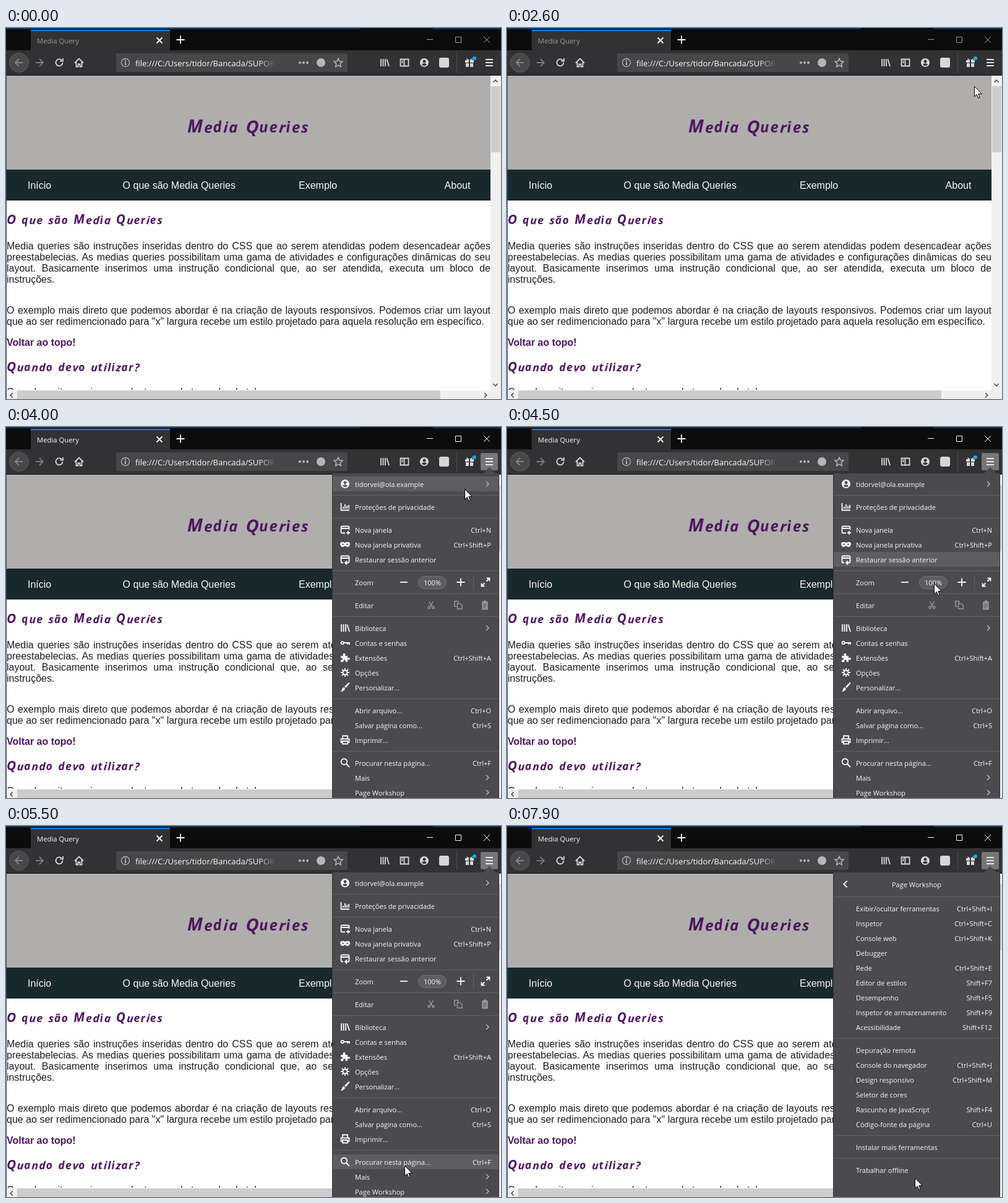
Animation of 800x600 px, one loop 8 s. Source, as an HTML page:

```html
<!DOCTYPE html>
<html lang="pt-BR">
<head>
<meta charset="utf-8">
<title>Media Query</title>
<style>
  html, body { margin: 0; width: 100%; height: 100%; overflow: hidden; background: #fff; }
  svg { display: block; width: 800px; height: 600px; }
  .ui { font: 500 11px "Open Sans", "Noto Sans", sans-serif; }
  .page { font: 16px/18px "Liberation Sans", Arial, sans-serif; }
  .hand { font-family: "Open Sans", "Noto Sans", sans-serif; font-weight: 700; font-style: italic;
    letter-spacing: 0.075em; word-spacing: 0.12em; }
  .hand tspan { font-size: 1.18em; }
  p { margin: 0 0 32px; text-align: justify; color: #1c1c1c; }
</style>
</head>
<body>
<svg viewBox="0 0 800 600">
  <defs>
    <linearGradient id="fade" gradientUnits="userSpaceOnUse" x1="408" x2="436">
      <stop stop-color="#f9f9fa"/><stop offset="1" stop-color="#f9f9fa" stop-opacity="0"/>
    </linearGradient>
    <clipPath id="panel"><rect x="528" y="75" width="268" height="525"/></clipPath>
    <clipPath id="view"><rect y="77" width="783" height="508"/></clipPath>
  </defs>
  <g id="page" class="page" clip-path="url(#view)"></g>
  <foreignObject class="page" x="1" y="344" width="782" height="150">
    <p>Media queries são instruções inseridas dentro do CSS que ao serem atendidas podem desencadear ações preestabelecias. As medias queries possibilitam uma gama de atividades e configurações dinâmicas do seu layout. Basicamente inserimos uma instrução condicional que, ao ser atendida, executa um bloco de instruções.</p>
    <p>O exemplo mais direto que podemos abordar é na criação de layouts responsivos. Podemos criar um layout que ao ser redimencionado para "x" largura recebe um estilo projetado para aquela resolução em específico.</p>
  </foreignObject>
  <g id="browser" class="ui"></g>
  <g id="menu" class="ui"></g>
  <path id="cursor" d="M0 0v16.5l3.8-3.6 2.6 6 2.4-1-2.6-5.8h5.4z" fill="#fff" stroke="#000"/>
</svg>
<script>
const $ = id => document.getElementById(id);
const WHITE = '#f9f9fa', GREY = '#b6b6b8', LINE = '#626266', PURPLE = '#4f165f';

const rect = (x, y, w, h, fill, more = '') =>
  `<rect x="${x}" y="${y}" width="${w}" height="${h}" fill="${fill}" ${more}/>`;
const text = (x, y, s, fill = WHITE, more = '') =>
  `<text x="${x}" y="${y}" fill="${fill}" ${more}>${s}</text>`;
const dot = (x, y, r, fill, more = '') =>
  `<circle cx="${x}" cy="${y}" r="${r}" fill="${fill}" ${more}/>`;

// Icons live in a 16 x 16 box
const strokes = {
  back: 'M14 8H2M8 2L2 8l6 6',
  reload: 'M13.5 8a5.5 5.5 0 1 1-1.6-4M14 1v4.5H9.5',
  home: 'M1 8.5l7-7 7 7M3.5 7v7.5h3v-4h3v4h3V7',
  star: 'M8 1.2l2 4.6 5 .5-3.8 3.4 1.1 5L8 12.1l-4.3 2.6 1.1-5L1 6.3l5-.5z',
  sidebar: 'M1.5 2.5h13v11h-13zM7.5 2.5v11M3.5 5.5h2M3.5 8h2',
  bars: 'M2 3h12M2 8h12M2 13h12',
  plus: 'M8 1.5v13M1.5 8h13',
  minus: 'M2 8h12',
  cross: 'M3.5 3.5l9 9M12.5 3.5l-9 9',
  chevron: 'M6 4l4 4-4 4',
  chart: 'M1.5 2v11.5H15M5 11V8M8 11V4M11 11V6.5M14 11V5',
  window: 'M14.5 8V4.5q0-2-2-2h-9q-2 0-2 2v7q0 2 2 2H8M1.5 6h13M13 10v6M10 13h6',
  restore: 'M5 13.5H3.5q-2 0-2-2v-7q0-2 2-2h9q2 0 2 2v7q0 2-2 2H8M1.5 6h13M11 10.5l-3 3 3 3',
  books: 'M2 2v12M5.5 2v12M9 2v12M11.5 2.5L15 14',
  key: 'M1.5 8a2.2 2.2 0 1 0 4.4 0a2.2 2.2 0 1 0-4.4 0M6 8h9v3M12 8v3',
  gear: 'M8 4.5a3.5 3.5 0 1 1-.1 0M8 1v3M8 12v3M1 8h3M12 8h3M3 3l2 2M11 11l2 2M13 3l-2 2M5 11l-2 2',
  printer: 'M4 6V1.5h8V6M4 12H1.5V6.5h13V12H12M4 10h8v4.5H4z',
  search: 'M6.5 1.5a4.8 4.8 0 1 1-.1 0M10 10l5 5',
  expand: 'M9.5 6.5L14 2M9.5 1.5h5v5M6.5 9.5L2 14M1.5 9.5v5h5',
  scissors: 'M4 1l6 10M12 1L6 11M4 10.5a2 2 0 1 1-.1 0M12 10.5a2 2 0 1 1-.1 0',
  copy: 'M5 10.5H1.5v-9h6V5M6.5 5.5h5l3 3v6h-8z'
};
const solids = {
  user: 'M8 1a7 7 0 1 1-.1 0zM8 3.5a2.5 2.5 0 1 0 .1 0zM3.8 11q4.2 4.5 8.4 0-1.5-1.7-4.2-1.7t-4.2 1.7z',
  mask: 'M0 7q0-3 3.5-3 2.5 0 4.5 1 2-1 4.5-1Q16 4 16 7q-.5 5-4 5-2 0-4-2-2 2-4 2-3.5 0-4-5zM2.5 7.5q2-1.5 4 .5-2 1.5-4-.5zM13.5 7.5q-2-1.5-4 .5 2 1.5 4-.5z',
  puzzle: 'M1 5h4Q3.5 1 6.5 1T8 5h4v3.5q4-1.5 4 1.3t-4 1.2v4H8.5q1-3.5-1.5-3.5T5.5 15H1v-3.5q3 1 3-1.5T1 8.5z',
  brush: 'M15 0q2 1-6 9L7 7q7-8 8-7zM6 8l2 2q-1 5-8 5 3-1 3-4 1-3 3-3z',
  gift: 'M1 4h6v4H1zM9 4h6v4H9zM2 9h5v6H2zM9 9h5v6H9zM3 1l5 3 5-3-1 3H4z',
  paste: 'M3 2h3V0h4v2h3v14H3zM5 6h6v1H5zM5 9h6v1H5zM5 12h4v1H5z'
};
function icon(name, x, y, color = WHITE, scale = 1, turn = 0, width = 1.8) {
  const paint = solids[name]
    ? `fill="${color}" fill-rule="evenodd"`
    : `fill="none" stroke="${color}" stroke-width="${width}"`;
  return `<path d="${solids[name] || strokes[name]}" ${paint}
    transform="translate(${x} ${y}) rotate(${turn}) scale(${scale}) translate(-8 -8)"/>`;
}

// Headings: slightly tilted letters with large capitals
const heading = (x, y, size, s) => text(x, y, s.replace(/[A-Z]/g, '<tspan>$&</tspan>'), PURPLE,
  `class="hand" font-size="${size}"
   rotate="${[...s].map((_, i) => (5 * Math.sin(i * 2.3)).toFixed(1)).join(' ')}"`);

$('page').innerHTML =
  rect(0, 77, 783, 508, '#fefefe') +
  rect(1, 77, 782, 152, '#afaeac') +
  rect(1, 229, 782, 50, '#19282c') +
  text(35, 260, 'Início') + text(188.6, 260, 'O que são Media Queries') +
  text(473, 260, 'Exemplo') + text(708.6, 260, 'About') +
  heading(293, 169, 24, 'Media Queries') +
  heading(1, 317, 17.6, 'O que são Media Queries') +
  text(1, 514, 'Voltar ao topo!', PURPLE, 'font-weight="bold"') +
  heading(1, 555, 17.6, 'Quando devo utilizar?') +
  text(1, 594, 'Quando o site precisar se adaptar a cada tamanho de tela.', '#1c1c1c');

$('browser').innerHTML =
  // scrollbars
  rect(783, 77, 17, 523, '#f0f0f0') + rect(0, 586, 800, 14, '#f0f0f0') +
  rect(784, 94, 15, 107, '#cdcdcd') + rect(18, 586, 684, 14, '#cdcdcd') +
  icon('chevron', 791, 86, '#505050', 0.9, -90) + icon('chevron', 791, 577, '#505050', 0.9, 90) +
  icon('chevron', 9, 594, '#505050', 0.9, 180) + icon('chevron', 775, 594, '#505050', 0.9) +
  // tab strip
  rect(0, 0, 800, 77, '#0c0c0d') + rect(0, 0, 800, 2, '#12355b') +
  rect(572, 0, 118, 2, '#0a0f1c') +
  rect(40, 3, 225, 34, '#323234') + rect(40, 3, 225, 2, '#0a84ff') +
  icon('cross', 248, 20) + icon('plus', 282, 19) +
  `<g id="frame">` + text(50, 25, 'Media Query', 'currentColor', 'font-size="11.3"') +
  `<path d="M680 18.5h10M726.5 14.5h9v9h-9zM772 14l10 10M782 14l-10 10" fill="none" stroke="currentColor"/></g>` +
  // toolbar
  rect(0, 36, 800, 40, '#323234') +
  dot(21, 56, 15.5, '#48484a', 'stroke="#5c5c5e"') +
  icon('back', 21, 56, '#838385') + icon('back', 54, 56, '#7a7a7c', 1, 180) +
  icon('reload', 86, 56, '#d8d8da') + icon('home', 118, 56, '#d8d8da') +
  rect(178, 41, 374, 30, '#474749', 'rx="2"') +
  dot(193, 56, 6.5, 'none', `stroke="${GREY}" stroke-width="1.3"`) +
  rect(192, 55, 2, 5, GREY) + rect(192, 52, 2, 2, GREY) +
  text(209, 62, 'file:///C:/Users/tidor/Bancada/SUPOR', 'url(#fade)', 'font-size="13"') +
  [475, 481, 487].map(x => dot(x, 56, 2, GREY)).join('') +
  dot(509, 56, 7, GREY) + icon('star', 537, 56, GREY, 1, 0, 1.5) +
  icon('books', 612, 56, '#d8d8da') + icon('sidebar', 644, 56, '#d8d8da') +
  icon('user', 676, 56, '#d8d8da') + rect(700, 48, 16, 16, '#d7d7d9', 'rx="3"') +
  rect(728, 40, 1, 32, '#4c4c4e') + icon('gift', 749, 56, '#d8d8da') + dot(757, 49, 3, '#00b3f4') +
  `<rect id="button" x="767" y="42" width="28" height="28" rx="2"/>` +
  icon('bars', 781, 56, '#e6e6e8') +
  rect(0, 77, 1, 523, '#1b4a75');

// Rows are "label|shortcut|icon"; ">" as shortcut marks a submenu, "-" a separator
function rows(list, y) {
  return list.map(row => {
    if (row === '-') {
      y += 13;
      return rect(528, y - 19, 268, 1, LINE);
    }
    const [label, key, name] = row.split('|');
    const out = text(564, y + 5, label) + (name ? icon(name, 548, y) : '') +
      (key === '>' ? icon('chevron', 778, y, GREY, 1, 0, 1.5)
        : key ? text(784, y + 5, key, WHITE, 'text-anchor="end"') : '');
    y += 24;
    return out;
  }).join('');
}

const mainRows = ['tidorvel@ola.example|>|user', '-', 'Proteções de privacidade||chart', '-',
  'Nova janela|Ctrl+N|window', 'Nova janela privativa|Ctrl+Shift+P|mask',
  'Restaurar sessão anterior||restore', '-', 'Zoom', '-', 'Editar', '-',
  'Biblioteca|>|books', 'Contas e senhas||key', 'Extensões|Ctrl+Shift+A|puzzle',
  'Opções||gear', 'Personalizar...||brush', '-',
  'Abrir arquivo...|Ctrl+O', 'Salvar página como...|Ctrl+S', 'Imprimir...||printer', '-',
  'Procurar nesta página...|Ctrl+F|search', 'Mais|>', 'Page Workshop|>'];
const toolRows = ['Exibir/ocultar ferramentas|Ctrl+Shift+I', 'Inspetor|Ctrl+Shift+C',
  'Console web|Ctrl+Shift+K', 'Debugger', 'Rede|Ctrl+Shift+E', 'Editor de estilos|Shift+F7',
  'Desempenho|Shift+F5', 'Inspetor de armazenamento|Shift+F9', 'Acessibilidade|Shift+F12', '-',
  'Depuração remota', 'Console do navegador|Ctrl+Shift+J', 'Design responsivo|Ctrl+Shift+M',
  'Seletor de cores', 'Rascunho de JavaScript|Shift+F4', 'Código-fonte da página|Ctrl+U', '-',
  'Instalar mais ferramentas', '-', 'Trabalhar offline'];

$('menu').innerHTML =
  rect(527.5, 74.5, 269, 530, '#4a4a4f', 'stroke="#333337"') +
  `<path d="M771 75l10-10 10 10z" fill="#4a4a4f"/>
  <g clip-path="url(#panel)"><g id="main">` +
  `<rect id="hover" x="528" width="268" height="24" fill="#5d5d62"/>` + rows(mainRows, 92) +
  icon('minus', 643, 251) + rect(666.5, 241.5, 45, 20, '#5c5c61', 'rx="10" stroke="#737378"') +
  text(689, 256, '100%', WHITE, 'text-anchor="middle"') + icon('plus', 735, 251) +
  rect(755, 239, 1, 25, LINE) + icon('expand', 775, 251) +
  icon('scissors', 687, 288, '#98989b', 0.85, 0, 1.6) + icon('copy', 731, 288, '#98989b', 0.95, 0, 1.5) +
  icon('paste', 774, 288, '#98989b', 0.95) +
  `</g><g id="tools">` + icon('chevron', 547, 94, WHITE, 1.3, 180, 1.5) +
  text(662, 99, 'Page Workshop', WHITE, 'text-anchor="middle"') +
  rect(528, 114, 268, 1, LINE) + rows(toolRows, 133) + `</g></g>`;

// Pointer keys: time, x, y
const pointerPath = [[700, 4, 1], [1100, 235, 128], [1300, 350, 170], [1500, 454, 188],
  [1900, 590, 176], [2400, 705, 129], [2600, 755, 94], [2800, 776, 60], [3000, 781, 47],
  [3600, 781, 47], [3700, 777, 53], [4000, 741, 100], [4500, 690, 253], [4900, 642, 412],
  [5000, 636, 436], [5400, 640, 533], [5600, 648, 565], [5700, 648, 565], [6400, 669, 588],
  [7700, 669, 588], [7900, 659, 569]];
function pointer(t) {
  const i = Math.max(1, pointerPath.findIndex(key => key[0] >= t));
  const [a, b] = [pointerPath[i - 1], pointerPath[i]];
  const u = Math.max(0, (t - a[0]) / (b[0] - a[0]));
  return [1, 2].map(k => Math.round(a[k] + (b[k] - a[k]) * u));
}

const rowTops = [];
mainRows.reduce((y, row) => {
  if (row === '-') return y + 13;
  if (!/^(Zoom|Editar)/.test(row)) rowTops.push(y);
  return y + 24;
}, 80);

function draw() {
  const t = Math.floor(performance.now() % 8000 / 100) * 100;
  const [x, y] = pointer(t);
  const seenY = pointer(t - 100)[1]; // hover reacts one step late
  const active = t >= 3200;

  $('cursor').setAttribute('transform', `translate(${x + 0.5} ${y + 0.5})`);
  $('cursor').style.display = t < 700 ? 'none' : '';
  $('frame').style.color = active ? WHITE : '#98989a';
  $('button').setAttribute('fill', active ? '#767678' : t > 2600 && seenY < 70 ? '#4b4b4d' : 'none');

  $('menu').style.opacity = t < 3300 ? 0 : t < 3400 ? 0.33 : 1;
  $('menu').setAttribute('transform', `translate(0 ${t < 3400 ? -2 : 0})`);
  const top = rowTops.find(r => seenY >= r && seenY < r + 24);
  $('hover').setAttribute('y', top ?? -50);

  const slide = t < 7300 ? 0 : t < 7400 ? 0.45 : t < 7500 ? 0.9 : 1;
  $('main').setAttribute('transform', `translate(${-268 * slide} 0)`);
  $('tools').setAttribute('transform', `translate(${268 * (1 - slide)} 0)`);
  requestAnimationFrame(draw);
}
draw();
</script>
</body>
</html>
```
